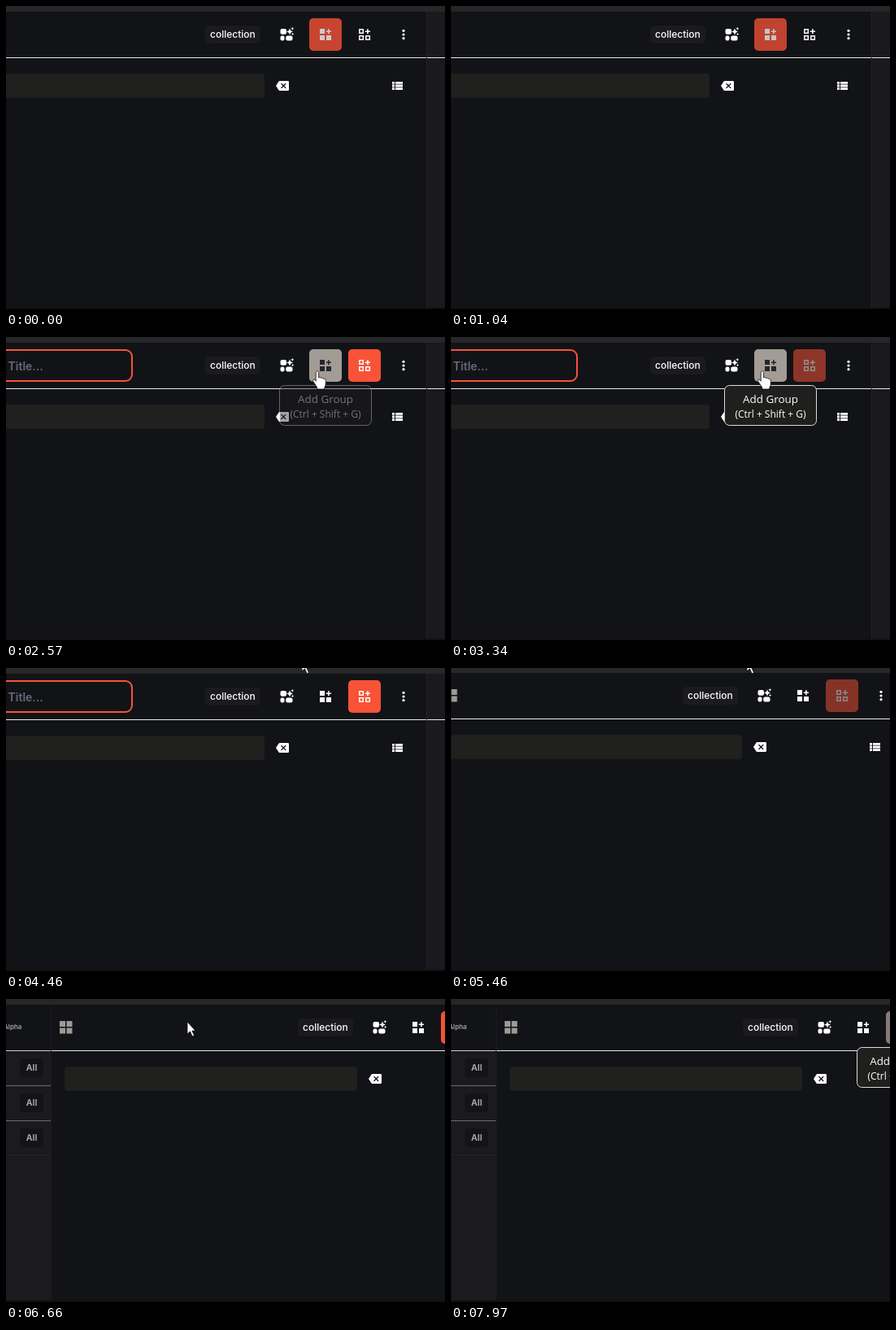
An HTML page for the animation above (8000 ms loop, 540 px wide and 372 px high).

```html
<!DOCTYPE html>
<html lang="en">
<head>
<meta charset="utf-8">
<title>Toolbar</title>
<style>
  html, body { margin: 0; width: 100%; height: 100%; overflow: hidden; background: #121316; }
  svg { display: block; width: 540px; height: 372px; }
  text { font-family: Inter, sans-serif; fill: #fff; }
  .tip text { font-family: "Open Sans", "Noto Sans", sans-serif; text-anchor: middle; }
  .tip rect { fill: #1f1f1e; stroke: #dcdcdc; }
  .icon { fill: #fff; }
  .tag rect { fill: #131417; }
  .tag text { font-size: 10.5px; font-weight: 700; fill: #a8a2a6; text-anchor: middle; }
</style>
</head>
<body>
<svg viewBox="0 0 540 372">
  <defs>
    <path id="plus" d="M396.1 28.2h1.6v2.2h2.3v1.6h-2.3v2.2h-1.6V32h-2.3v-1.6h2.3z"/>
  </defs>

  <g id="page">
    <rect x="-200" width="800" height="7" fill="#27272a"/>

    <!-- left sidebar -->
    <rect x="-200" y="64" width="141" height="310" fill="#1b1b1f"/>
    <path d="M-200 63.5H-59" stroke="#d0d0d0"/>
    <path d="M-200 106.5H-59M-200 149.5H-59" stroke="#6c6c6f"/>
    <path d="M-200 191.5H-59" stroke="#252529"/>
    <path d="M-58.5 7V372" stroke="#1c1c20"/>
    <text x="-117" y="37" font-size="8" font-weight="600" style="fill:#a8a2a6">Alpha</text>
    <g id="tags"></g>

    <!-- right sidebar -->
    <rect x="518" y="7" width="200" height="365" fill="#1a1a1e"/>
    <path d="M517.5 7V372" stroke="#242428"/>
    <path d="M-58 63.5H517M518 63.5H720" stroke="#ebebeb"/>

    <!-- header -->
    <path d="M-48 27h7v7h-7zM-39.5 27h7v7h-7zM-48 35.5h7v7h-7zM-39.5 35.5h7v7h-7z" fill="#9d9995"/>
    <rect x="245" y="24" width="68" height="22" rx="5" fill="#1b1a1e"/>
    <text x="251" y="39" font-size="12" font-weight="500">collection</text>
    <g class="icon">
      <rect x="337.5" y="28" width="7.5" height="6.8" rx="2"/>
      <rect x="337.5" y="36.5" width="5" height="6" rx="2"/>
      <rect x="344.3" y="36.5" width="8.2" height="6" rx="2"/>
      <path d="M349 27.5l1.2 2.8 2.8 1.2-2.8 1.2-1.2 2.8-1.2-2.8-2.8-1.2 2.8-1.2zM352.3 25.8l.6 1.4 1.4.6-1.4.6-.6 1.4-.6-1.4-1.4-.6 1.4-.6zM352.6 32.8l.5 1.2 1.2.5-1.2.5-.5 1.2-.5-1.2-1.2-.5 1.2-.5z"/>
      <circle cx="489" cy="30.3" r="1.6"/>
      <circle cx="489" cy="35" r="1.6"/>
      <circle cx="489" cy="39.7" r="1.6"/>
    </g>

    <g id="group">
      <rect class="back" x="373" y="15" width="40" height="40" rx="5"/>
      <g class="icon">
        <path d="M386 28h6v6h-6zM386 36h6v6h-6zM394 36h6v6h-6z"/>
        <use href="#plus"/>
      </g>
    </g>
    <g id="item">
      <rect class="back" x="421" y="15" width="40" height="40" rx="5"/>
      <g class="icon">
        <path d="M434.8 28.8h4.5v4.5h-4.5zM434.8 36.8h4.5v4.5h-4.5zM442.8 36.8h4.5v4.5h-4.5z" fill="none" stroke="#fff" stroke-width="1.5"/>
        <use href="#plus" x="48"/>
      </g>
    </g>

    <!-- search row -->
    <rect x="-41.5" y="83.5" width="359" height="29" rx="2" fill="#20201f" stroke="#1d1d1d"/>
    <path class="icon" transform="translate(332 90) scale(.6667)" d="M22 3H7c-.7 0-1.2.4-1.6.9L0 12l5.4 8.1c.4.5.9.9 1.6.9h15a2 2 0 0 0 2-2V5a2 2 0 0 0-2-2m-3 12.6L17.6 17 14 13.4 10.4 17 9 15.6 12.6 12 9 8.4 10.4 7 14 10.6 17.6 7 19 8.4 15.4 12z"/>
    <path class="icon" d="M475 93h3v2.8h-3zM479 93h9v2.8h-9zM475 96.6h3v2.8h-3zM479 96.6h9v2.8h-9zM475 100.2h3v2.8h-3zM479 100.2h9v2.8h-9z"/>

    <g id="field">
      <rect x="-40" y="16" width="195" height="38" rx="8" fill="#121316" stroke="#f8533a" stroke-width="2"/>
      <text x="2.5" y="41" font-size="14" font-weight="600" style="fill:#69677d">Title...</text>
    </g>

    <g id="groupTip" class="tip">
      <rect x="336.5" y="59.5" width="113" height="49" rx="6"/>
      <text x="393" y="81" font-size="13.4">Add Group</text>
      <text x="393" y="99" font-size="12">(Ctrl + Shift + G)</text>
    </g>
    <g id="itemTip" class="tip">
      <rect x="385.5" y="59.5" width="111" height="49" rx="6"/>
      <text x="441" y="81" font-size="13.4">Add Element</text>
      <text x="441" y="99" font-size="12">(Ctrl + Shift + E)</text>
    </g>
  </g>

  <path d="M0 371H540" stroke="#151012" stroke-width="2"/>

  <g id="cursor" fill="#fff" stroke="#111" stroke-width=".8" stroke-linejoin="round">
    <path id="arrow" d="M0 0v15l3.5-3.2 2.6 6 2.4-1-2.6-5.8H10z"/>
    <path id="hand" d="M-1.8 1.5C-1.8-.6 1.6-.6 1.6 1.5V8c1-1 3-.6 3.2.7 1-.8 2.8-.4 3 .9 1.2-.6 2.5.1 2.5 1.6V15c0 3-1.5 4-1.8 7H.2C-.5 18-4 15-5.3 12.3c-.8-1.8 1-2.8 2.2-1.6l1.3 1.5z"/>
  </g>
</svg>

<script>
const LOOP = 8000;
const RED = '#fa5438', WHITE = '#ffffff', DARK = '#25252c';
const $ = id => document.getElementById(id);

$('tags').innerHTML = [73, 116, 159].map(y => `<g class="tag">
  <rect x="-97" y="${y}" width="29" height="23" rx="4"/>
  <text x="-82.5" y="${y + 15}">All</text></g>`).join('');

// Cursor hotspot: time, x, y
const PATH = [
  [1030, 546, 165], [1220, 482, 132], [1400, 419, 83], [1560, 393, 56], [1740, 381, 44],
  [1940, 381, 44], [2020, 383, 42], [3850, 383, 42], [4000, 379, 28], [4200, 370, 0],
  [4400, 364, -11], [6310, 364, -11], [6500, 282, 10], [6660, 223, 28], [6800, 203, 37],
  [6980, 218, 46], [7150, 290, 47], [7400, 440, 40], [7600, 546, 34],
];

const ramp = (t, a, b) => Math.min(1, Math.max(0, (t - a) / (b - a)));
const mix = (a, b, p) => `color-mix(in srgb, ${b} ${p * 100}%, ${a})`;
const pulse = (t, peak) => .75 + .25 * Math.cos(Math.PI * (t - peak) / 1000);

function cursorAt(t) {
  const i = PATH.findIndex(k => k[0] > t);
  if (i < 1) return i ? PATH.at(-1).slice(1) : PATH[0].slice(1);
  const [a, b] = [PATH[i - 1], PATH[i]];
  const p = ramp(t, a[0], b[0]);
  return [a[1] + (b[1] - a[1]) * p, a[2] + (b[2] - a[2]) * p];
}

function paint(id, fill, fillOpacity, icon, opacity) {
  const el = $(id), back = el.querySelector('.back');
  back.style.fill = fill;
  back.style.fillOpacity = fillOpacity;
  el.querySelector('.icon').style.fill = icon;
  el.style.opacity = opacity;
}

function draw(t) {
  const pan = 1 - (1 - ramp(t, 5380, 6170)) ** 4;
  const lift = pan > .05 && pan < .97 ? -1 : 0;
  $('page').setAttribute('transform', `translate(${Math.round(114 * pan)} ${lift})`);

  const hover = ramp(t, 1590, 1740), press = ramp(t, 1930, 2020), leave = ramp(t, 3880, 4250);
  paint('group',
    mix(mix(RED, '#676361', hover), '#a39c96', press),
    1 - leave,
    mix(mix(WHITE, DARK, hover), WHITE, leave),
    hover ? 1 : pulse(t, -460));

  const active = ramp(t, 2400, 2550), over = ramp(t, 7620, 7900);
  const beat = t < 2500 ? 1 : pulse(t, 2500);
  paint('item', mix(RED, '#857a77', over), active, WHITE, beat + (1 - beat) * over);

  $('field').style.opacity = ramp(t, 2370, 2520) * (1 - ramp(t, 5060, 5160));
  $('groupTip').style.opacity = ramp(t, 2480, 2700) * (1 - ramp(t, 3880, 4080));
  $('itemTip').style.opacity = ramp(t, 7720, 7940);

  const [x, y] = cursorAt(t);
  const onButton = x > 373 && x < 413 && y > 15 && y < 55 && t < 4500;
  $('cursor').setAttribute('transform', `translate(${x} ${y})`);
  $('hand').style.display = onButton ? '' : 'none';
  $('arrow').style.display = onButton ? 'none' : '';
}

let start;
function frame(now) {
  start ??= now;
  draw((now - start) % LOOP);
  requestAnimationFrame(frame);
}
draw(0);
requestAnimationFrame(frame);
</script>
</body>
</html>
```
